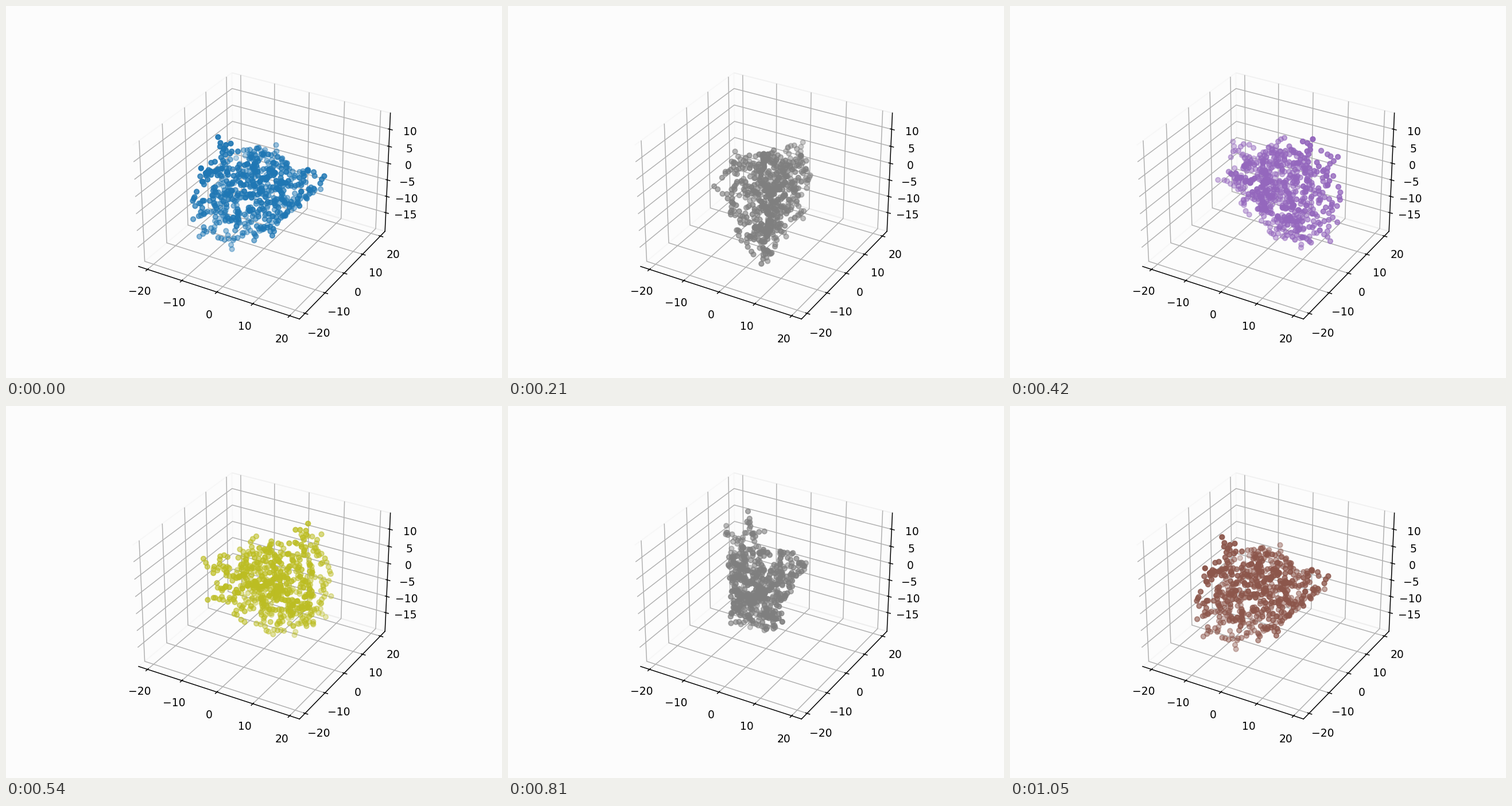
These frames come from a looping animation (864 by 648 pixels, 1.08 s). A matplotlib script:

```python
import numpy as np
import matplotlib.pyplot as plt
from matplotlib.animation import FuncAnimation

FRAMES = 36
COUNT = 580
STEP = 1.25    # spacing along a chain
GAP = 2.0      # free room a new goal needs
rng = np.random.default_rng(11)

# Outermost tips of the cluster: (right, back, up) from the camera.
TIPS = np.array([
    (-11, -3, 14), (-15, -8, 8), (-19, -6, -2.5), (-16, -4, -14.5),
    (-8, -3, -19), (-11, 3, -14), (0, 1, -16), (2, -9, -11),
    (9, -10, -1), (14.5, -5, 4), (14, 2, -4), (2, -9, 8),
    (3, 9, 5), (-7, 11, 0)])


def chain(start, end):
    """Slightly rough row of particles from start to end."""
    n = max(1, round(np.linalg.norm(end - start) / STEP))
    t = np.arange(1, n + 1)[:, None] / n
    rough = rng.normal(0, 0.3, (n, 3)) * (t < 1)
    return start + (end - start) * t + rough


def reach(pts, goal):
    """Grow a chain to the goal from the nearest particle."""
    gaps = np.linalg.norm(pts - goal, axis=1)
    if gaps.min() < GAP:
        return pts
    return np.vstack([pts, chain(pts[gaps.argmin()], goal)])


def fill(pts, count):
    """Grow towards random places inside the hull of the tips."""
    while len(pts) < count:
        corners = TIPS[rng.choice(len(TIPS), 4, replace=False)]
        pts = reach(pts, rng.dirichlet(np.full(4, 0.8)) @ corners)
    return pts


def grow():
    pts = fill(np.zeros((1, 3)), COUNT // 2)
    for tip in TIPS:
        pts = reach(pts, tip)
    return fill(pts, COUNT)


right, back, up = grow().T

fig = plt.figure(figsize=(6.4, 4.8), dpi=135, facecolor="#fcfcfc")
ax = fig.add_subplot(projection="3d", facecolor="#fcfcfc")
ax.set(xlim=(-22.65, 22.65), ylim=(-22.7, 22.7), zlim=(-20.78, 14.7),
       xticks=range(-20, 21, 10), yticks=range(-20, 21, 10),
       zticks=range(-15, 11, 5))
for axis in (ax.xaxis, ax.yaxis, ax.zaxis):
    axis.pane.fill = False

cloud = None


def update(i):
    global cloud
    if cloud is not None:
        cloud.remove()
    a = np.pi / 6 + 2 * np.pi * i / (FRAMES - 1)
    x = right * np.cos(a) - back * np.sin(a)
    y = right * np.sin(a) + back * np.cos(a)
    cloud = ax.scatter(x, y, up, color=f"C{i % 10}")
    return [cloud]


anim = FuncAnimation(fig, update, frames=FRAMES, interval=30,
                     init_func=lambda: [], repeat=True, repeat_delay=0)
plt.show()
```
